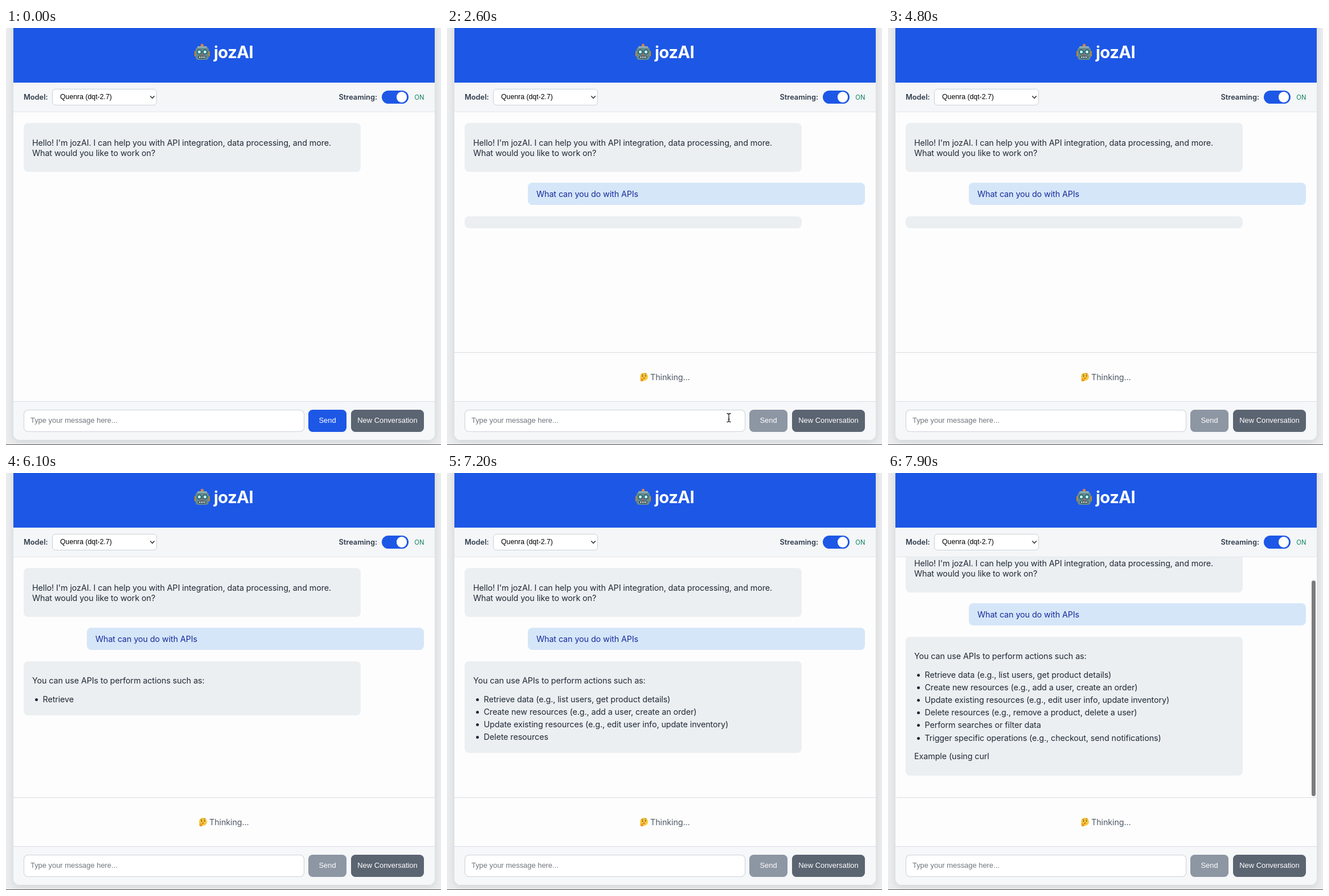
Recreate the animation shown at these times as an HTML page. Size 764 by 733 pixels, loop 8000 ms.

```html
<!DOCTYPE html>
<html lang="en">
<head>
<meta charset="utf-8">
<title>Chat</title>
<style>
html, body { margin: 0; width: 100%; height: 100%; overflow: hidden; background: #ebecee; }
* { box-sizing: border-box; }
#stage { position: absolute; left: 0; top: 0; width: 764px; height: 733px; overflow: hidden;
  font: 14.3px/18px Inter, sans-serif; letter-spacing: -.075px; color: #1f2937; }
#stage div, #stage span, #stage svg { position: absolute; white-space: pre; }
#card, #header, #controls, #thinking, #footer { left: 13px; width: 740px; }
#card { top: -20px; height: 744px; border-radius: 11px; background: #fdfdfd;
  box-shadow: 0 4px 14px rgba(0, 0, 0, .1); }
#edge { left: 0; top: 732px; width: 764px; height: 1px; background: #555; }
#header { top: 0; height: 96px; background: #1d57e6; }
#title { left: 365px; top: 25px; font-size: 29.2px; line-height: 36px; font-weight: 700; letter-spacing: -.55px; color: #fff; }
#controls { top: 96px; height: 52px; background: #f4f6f8; border-bottom: 1px solid #e5e7ea; }
.label { top: 113px; font-size: 12.8px; font-weight: 600; letter-spacing: 0; color: #303b4b; }
#select { left: 81px; top: 107px; width: 184px; height: 29px; border: 1px solid #cdd1d6; border-radius: 6px; background: #fff;
  padding-left: 13px; font: 12.3px/27px "Liberation Sans", Arial, sans-serif; letter-spacing: 0; color: #000; }
#toggle { left: 660px; top: 110px; width: 46.5px; height: 23px; border-radius: 12px; background: #1d57e6; }
#toggle div { left: 26px; top: 2.3px; width: 18.4px; height: 18.4px; border-radius: 50%; background: #fff; }
#on { right: 29.5px; top: 113px; font-size: 11.3px; letter-spacing: 0; color: #0d805b; }
#chat { left: 0; top: 148px; width: 764px; height: 508px; overflow: hidden; }
#log { left: 0; top: -148px; width: 764px; height: 900px; }
#exchange, #lines { left: 0; top: 0; }
.bubble { left: 31px; width: 592px; border-radius: 7.5px; background: #eceff1; }
.user { left: 142px; background: #d5e6f9; }
#thumb { left: 744px; width: 6.5px; border-radius: 4px; background: #7c7c7c; }
#thinking { top: 569.5px; height: 87px; border-top: 1px solid #dadce1; background: #fdfdfd; color: #4f5967; }
#thinking span { left: 344px; top: 34px; }
#footer { top: 656px; height: 68px; border-top: 1px solid #d9dce6; background: #f6f7f8; border-radius: 0 0 11px 11px; }
#input, .button { top: 671px; height: 39px; border-radius: 7.5px;
  font: 12.92px/38px "Liberation Sans", Arial, sans-serif; letter-spacing: 0; }
#input { left: 31px; width: 493px; background: #fff; box-shadow: inset 0 0 0 1px #cdd1d8; padding-left: 12px; color: #70757d; }
#input.focus { box-shadow: inset 0 0 0 2px #0d55c5; }
#input.filled { color: #000; }
#stage #caret { position: static; display: inline-block; vertical-align: middle; width: 1px; height: 15px; margin: -2px -1px 0 0; background: #000; }
.button { color: #fff; text-align: center; }
#send { left: 531px; width: 67px; background: #1d57e6; }
#send.off { background: #8d96a3; }
#new { left: 606px; width: 128px; background: #5b6471; }
.pointer { left: 0; top: 0; overflow: visible; }
</style>
</head>
<body>
<div id="stage">
  <div id="card"></div><div id="edge"></div>
  <div id="chat"><div id="log">
    <div class="bubble" style="top:167px;height:86px"></div>
    <span style="left:46px;top:192.5px">Hello! I'm jozAI. I can help you with API integration, data processing, and more.
What would you like to work on?</span>
    <div id="exchange">
      <div class="bubble user" style="top:272px;height:39px"></div>
      <span style="left:157px;top:283px;color:#172b9a">What can you do with APIs</span>
      <div class="bubble" id="reply" style="top:331px"></div>
      <div id="lines"></div>
    </div>
  </div></div>
  <div id="thumb"></div>
  <div id="header"></div>
  <svg style="left:330px;top:27px" width="29" height="30" viewBox="0 0 29 30">
    <path d="M14.5 4v6" stroke="#78909a" stroke-width="2"/>
    <circle cx="14.5" cy="3.4" r="2.6" fill="#d9823c"/>
    <rect x="1" y="13" width="4" height="10" rx="1.5" fill="#c48b25"/>
    <rect x="24" y="13" width="4" height="10" rx="1.5" fill="#c48b25"/>
    <path d="M5 8h19q2 0 2 3v13q0 5-5 5H8q-5 0-5-5V11q0-3 2-3z" fill="#628b91"/>
    <path d="M5 8h19l-2-3H7z" fill="#91adb2"/>
    <g fill="#75dce2" stroke="#27434d" stroke-width="1.3"><circle cx="9.5" cy="15" r="3.6"/><circle cx="19.5" cy="15" r="3.6"/></g>
    <g fill="#fff"><circle cx="9.5" cy="15" r="1.5"/><circle cx="19.5" cy="15" r="1.5"/></g>
    <path d="M14.5 17l2 3.4h-4z" fill="#d9423c"/>
    <rect x="7.5" y="22" width="14" height="4.5" rx="2" fill="#273940"/>
    <path d="M9 24.2h11" stroke="#e8eeee" stroke-width="2.4" stroke-dasharray="2 1"/>
  </svg>
  <div id="title">jozAI</div>
  <div id="controls"></div>
  <div class="label" style="left:31px">Model:</div>
  <div id="select">Quenra (dqt-2.7)</div>
  <svg style="left:252px;top:118px" width="10" height="8"><path d="M1.3 1.5L5 5.4l3.7-3.9" fill="none" stroke="#222" stroke-width="1.4"/></svg>
  <div class="label" style="right:112px">Streaming:</div>
  <div id="toggle"><div></div></div>
  <div id="on">ON</div>
  <div id="thinking">
    <svg style="left:325px;top:34.5px" width="16" height="17" viewBox="0 0 16 17">
      <circle cx="8" cy="8" r="7" fill="#fbc93d"/>
      <g fill="#59351c"><ellipse cx="5.5" cy="6.8" rx=".9" ry="1.2"/><ellipse cx="10.6" cy="6.4" rx=".9" ry="1.2"/></g>
      <path d="M3.6 4.3q1.6-1 3.2-.3M9 3.5q1.8-1.5 3.6-.4M6 10.6q2-1 4.2-.3" fill="none" stroke="#79491f" stroke-width=".8"/>
      <path d="M2 10.2l1.3-.4.9 2.1 4.3-1.4q1.3 0 .6 1.1l-2 1.1q.5 3-2.4 3.6-3.2.1-3.2-2.8z" fill="#eda026"/>
    </svg>
    <span>Thinking...</span>
  </div>
  <div id="footer"></div>
  <div id="input"></div>
  <div class="button" id="send">Send</div>
  <div class="button" id="new">New Conversation</div>
  <svg class="pointer" id="arrow" width="14" height="20"><path d="M0 0v14.3l3.3-3.1 2.4 5.5 2.5-1.1-2.4-5.4h4.5z" fill="#000" stroke="#fff"/></svg>
  <svg class="pointer" id="beam" width="10" height="16"><path d="M-3.5-7.5Q0-7.5 0-5Q0-7.5 3.5-7.5M0-5V5M-3.5 7.5Q0 7.5 0 5Q0 7.5 3.5 7.5M-1.5 2.5h3" fill="none" stroke="#222" stroke-width="1.3"/></svg>
</div>
<script>
const LOOP = 8000, STEP = 100, FOCUS = 100, SENT = 2200;
const PROMPT = "What can you do with APIs";
const REPLY = [
  "You can use APIs to perform actions such as:",
  "Retrieve data (e.g., list users, get product details)",
  "Create new resources (e.g., add a user, create an order)",
  "Update existing resources (e.g., edit user info, update inventory)",
  "Delete resources (e.g., remove a product, delete a user)",
  "Perform searches or filter data",
  "Trigger specific operations (e.g., checkout, send notifications)",
  "Example (using curl"
].map(line => line.split(" "));
const LAST = REPLY.length - 1;

// time, value...
const TYPING = [[400, 1], [1600, PROMPT.length]];
const WORDS = [[5700, 0], [6600, 24], [7200, 38], [7900, 60]];
const MOUSE = [[1700, 550, 606], [1800, 552, 633], [2100, 558, 685], [2200, 556, 686], [2500, 497, 685], [2600, 495, 685]];

const $ = id => document.getElementById(id);
const show = (el, on) => { el.style.display = on ? "" : "none"; };

function at(keys, t) {
  if (t <= keys[0][0]) return keys[0].slice(1);
  for (let i = 1; i < keys.length; i++) {
    const [a, b] = [keys[i - 1], keys[i]];
    if (t <= b[0]) return b.slice(1).map((v, k) => a[k + 1] + (v - a[k + 1]) * (t - a[0]) / (b[0] - a[0]));
  }
  return keys[keys.length - 1].slice(1);
}

const lineY = i => i === 0 ? 365.4 : 397.6 + (i - 1) * 22.2 + (i === LAST ? 10 : 0);

const rows = REPLY.map((_, i) => {
  const listed = i > 0 && i < LAST;
  const row = document.createElement("span");
  row.style.cssText = `left:${listed ? 64.5 : 46}px;top:${lineY(i) - 9}px`;
  const text = document.createElement("span");
  text.style.cssText = "left:0;top:0";
  row.append(text);
  if (listed) {
    const dot = document.createElement("div");
    dot.style.cssText = "left:-13.5px;top:7px;width:5px;height:5px;border-radius:50%;background:#1f2937";
    row.append(dot);
  }
  $("lines").append(row);
  return { row, text };
});

function drawReply(t) {
  let left = Math.floor(at(WORDS, t)[0] + .01), bottom = 352;
  rows.forEach(({ row, text }, i) => {
    const count = Math.min(left, REPLY[i].length);
    left -= count;
    show(row, count > 0);
    text.textContent = REPLY[i].slice(0, count).join(" ");
    if (count) bottom = lineY(i) + (i % LAST ? 28 : 34.3);
  });
  $("reply").style.height = bottom - 331 + "px";

  const scroll = Math.max(0, bottom - 532);
  const view = 422, track = 418, total = view + scroll;
  $("log").style.transform = `translateY(${-scroll}px)`;
  show($("thumb"), scroll > 0);
  $("thumb").style.top = 150 + scroll / total * track + "px";
  $("thumb").style.height = view / total * track + "px";
}

function drawInput(t) {
  const focus = t >= FOCUS && t < SENT;
  const typed = focus && t >= TYPING[0][0] ? PROMPT.slice(0, Math.round(at(TYPING, t)[0])) : "";
  const caret = focus ? '<span id="caret"></span>' : "";
  $("input").className = (focus ? "focus " : "") + (typed ? "filled" : "");
  $("input").innerHTML = typed ? typed + caret : caret + "Type your message here...";
}

function drawMouse(t) {
  const [x, y] = at(MOUSE, t);
  const visible = t >= 1700 && t < 3200, overInput = t >= SENT && x < 524;
  show($("arrow"), visible && !overInput);
  show($("beam"), visible && overInput);
  for (const id of ["arrow", "beam"]) $(id).style.transform = `translate(${x}px, ${y}px)`;
}

function frame() {
  const t = Math.floor(performance.now() % LOOP / STEP) * STEP;
  const sent = t >= SENT;
  show($("exchange"), sent);
  show($("thinking"), sent);
  $("send").classList.toggle("off", sent);
  drawInput(t);
  drawReply(t);
  drawMouse(t);
  requestAnimationFrame(frame);
}
frame();
</script>
</body>
</html>
```
